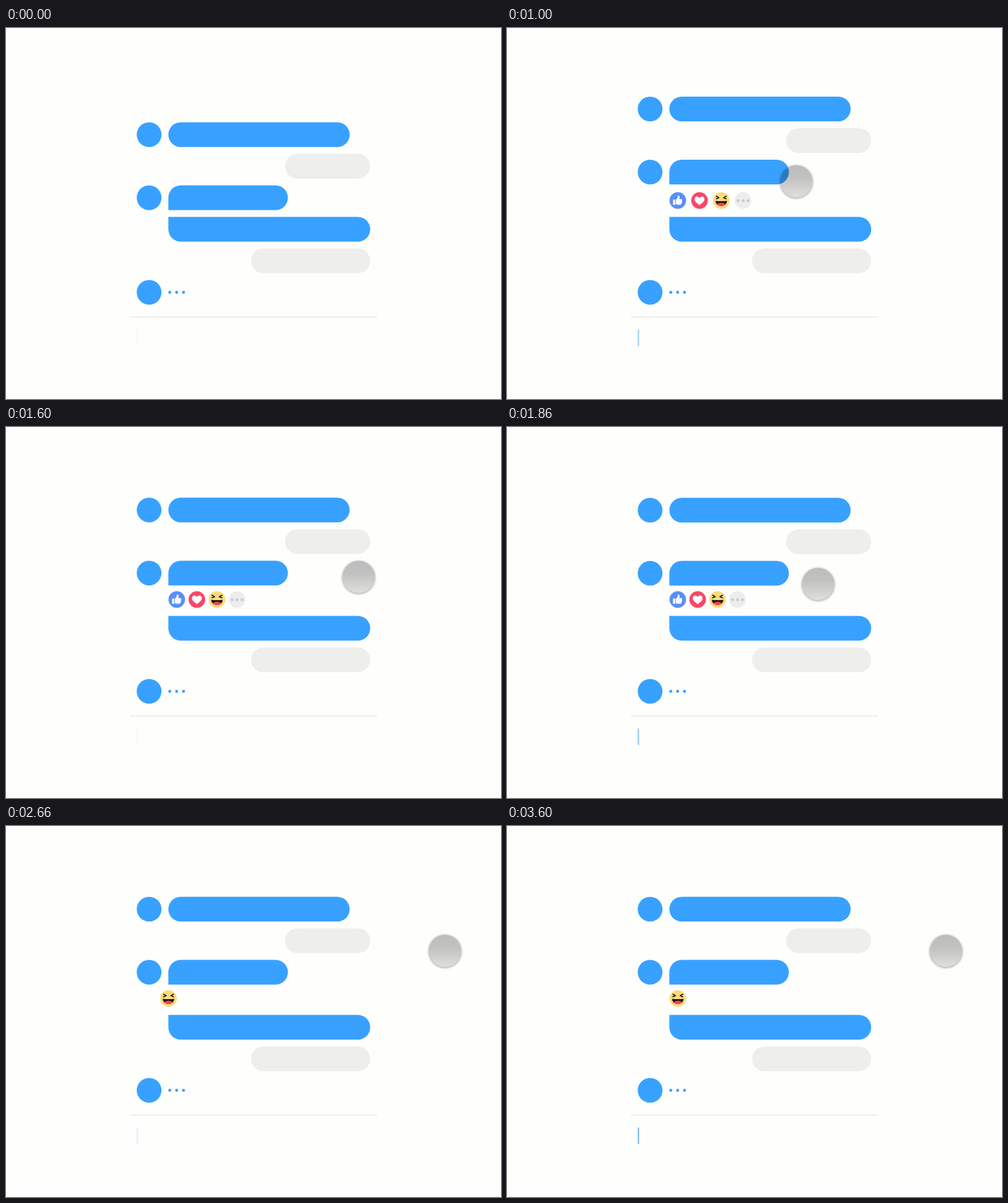
Write an HTML page with a canvas that moves like this. It is 800 px wide and 600 px high and loops after 3.63 s.

```html
<!DOCTYPE html>
<html lang="en">
<head>
<meta charset="utf-8">
<title>Message reactions</title>
<style>
html, body { margin: 0; width: 100%; height: 100%; overflow: hidden; background: #fefefd; }
canvas { display: block; width: 800px; height: 600px; }
</style>
</head>
<body>
<canvas id="stage" width="800" height="600"></canvas>
<script>
const ctx = document.getElementById('stage').getContext('2d');
const LOOP = 3630;
const BLUE = '#38a1ff', GREY = '#eeeeed', PAPER = '#fefefd';
const TAU = Math.PI * 2;

const clamp = v => Math.min(1, Math.max(0, v));
const progress = (t, from, to) => clamp((t - from) / (to - from));
const mix = (a, b, k) => a + (b - a) * k;
const smooth = u => u * u * (3 - 2 * u);
const easeIn = u => u * u;

// Underdamped step response, about 20% overshoot
function spring(t, start) {
  if (t <= start) return 0;
  const a = (t - start) / 275 * Math.PI;
  return 1 - Math.exp(-a / 2) * (Math.cos(a) + Math.sin(a) / 2);
}

function disc(x, y, r, color) {
  ctx.fillStyle = color;
  ctx.beginPath();
  ctx.arc(x, y, r, 0, TAU);
  ctx.fill();
}

function bubble(left, right, y, color, radii = 20) {
  ctx.fillStyle = color;
  ctx.beginPath();
  ctx.roundRect(left, y - 20, right - left, 40, radii);
  ctx.fill();
}

function fillPath(path, color) {
  ctx.fillStyle = color;
  ctx.fill(new Path2D(path));
}

function at(x, y, draw) {
  ctx.save();
  ctx.translate(x, y);
  draw();
  ctx.restore();
}

function thumb() {
  disc(0, 0, 13.4, '#5890f8');
  fillPath('M-7.6-1.5h3.6v8.5h-3.6z', '#fff');
  fillPath('M-3-1.4C-1-2.6 0-4.8 0-7C0-8.6 3-8.6 3-5.6C3-4 2.6-3 2.3-2.2'
    + 'H5.6C7.4-2.2 7.6-.4 6.6 .3C7.5 1.2 7.2 2.4 6.4 2.8C6.9 3.8 6.5 4.7 5.7 5'
    + 'C5.9 6.2 5.2 6.8 4 6.8H0C-1.2 6.8-2 6.2-3 6Z', '#fff');
}

function heart() {
  disc(0, 0, 13.4, '#f84866');
  fillPath('M0 7.4C-4.4 4.2-8 1.4-8-2C-8-7-2-8-0-3.8C2-8 8-7 8-2C8 1.4 4.4 4.2 0 7.4Z', '#fff');
}

function laugh() {
  disc(0, 0, 13.4, '#fdda7a');
  ctx.strokeStyle = '#1c1a17';
  ctx.lineWidth = 1.7;
  ctx.lineCap = ctx.lineJoin = 'round';
  ctx.stroke(new Path2D('M-8-7L-3.8-4.6L-8-2.8M8-7L3.8-4.6L8-2.8'));
  fillPath('M-9.2 .6Q0 1.6 9.2 .6C9.2 11.6-9.2 11.6-9.2 .6Z', '#1c1512');
  fillPath('M-6.8 6C-4 2.6 4 2.6 6.8 6C4 9.8-4 9.8-6.8 6Z', '#f5405c');
}

function more() {
  disc(0, 0, 13.4, '#ededed');
  for (const x of [-8, 0, 8]) disc(x, 0.3, 2.4, '#c9c9cf');
}

function reactions(t) {
  const spread = 32.2 * spring(t, 800);
  const rise = start => 279 - 38 * spring(t, start);
  at(276 + spread * 3, rise(2380), more);
  at(276 + spread, rise(2300), heart);
  at(276, rise(2220), thumb);
  at(276 + spread * 2 * (1 - spring(t, 2385)), 279, laugh);
}

function conversation(t) {
  const lift = -38 * spring(t, 800);
  if (t > 800) reactions(t);
  disc(231.3, 172.5 + lift, 20, BLUE);
  bubble(262.4, 555.4, 172.5 + lift, BLUE);
  bubble(451, 588.6, 223.5 + lift, GREY);
  disc(231.3, 274.5 + lift, 20, BLUE);
  bubble(262.4, 455.6, 274.5 + lift, BLUE, [20, 20, 20, 0]);
  bubble(262.4, 588.6, 325.5, BLUE, [0, 20, 20, 20]);
  bubble(396, 588.6, 376.5, GREY);
  disc(231.3, 427.5, 20, BLUE);
  for (const x of [264.7, 275.8, 286.9]) disc(x, 427.5, 2.4, BLUE);
}

function inputField(t) {
  ctx.fillStyle = '#eeeeee';
  ctx.fillRect(200, 466.5, 400, 2);
  const phase = t % 1400;
  const level = phase < 650 ? progress(phase, 230, 600) : 1 - progress(phase, 650, 1400);
  ctx.globalAlpha = Math.max(0.05, level);
  ctx.fillStyle = '#459fec';
  ctx.fillRect(211.4, 487.5, 2, 26.7);
  ctx.globalAlpha = 1;
}

const moves = [
  { from: 230, to: 590, x: 371, y: 256, ease: smooth },
  { from: 830, to: 1215, x: 603, y: 237, ease: smooth },
  { from: 1250, to: 2225, x: 348, y: 280, ease: easeIn },
  { from: 2310, to: 2640, x: 709.5, y: 202, ease: smooth }
];

function pointer(t) {
  let x = 840, y = 209;
  for (const m of moves) {
    const k = m.ease(progress(t, m.from, m.to));
    x = mix(x, m.x, k);
    y = mix(y, m.y, k);
  }
  at(x, y, () => {
    const glow = ctx.createRadialGradient(0, 0.8, 25, 0, 0.8, 29.5);
    glow.addColorStop(0, 'rgba(0,0,0,.3)');
    glow.addColorStop(0.4, 'rgba(0,0,0,.14)');
    glow.addColorStop(1, 'rgba(0,0,0,0)');
    ctx.fillStyle = glow;
    ctx.beginPath();
    ctx.arc(0, 0, 32, 0, TAU);
    ctx.arc(0, 0, 26, 0, TAU, true);
    ctx.fill();

    const shade = ctx.createLinearGradient(0, -26, 0, 26);
    shade.addColorStop(0, 'rgba(0,0,0,.26)');
    shade.addColorStop(0.4, 'rgba(0,0,0,.24)');
    shade.addColorStop(1, 'rgba(0,0,0,.12)');
    disc(0, 0, 26, shade);
  });
}

function draw(t) {
  ctx.fillStyle = PAPER;
  ctx.fillRect(0, 0, 800, 600);
  conversation(t);
  inputField(t);
  pointer(t);
}

const begin = performance.now();
function tick() {
  draw((performance.now() - begin) % LOOP);
  requestAnimationFrame(tick);
}
tick();
</script>
</body>
</html>
```
